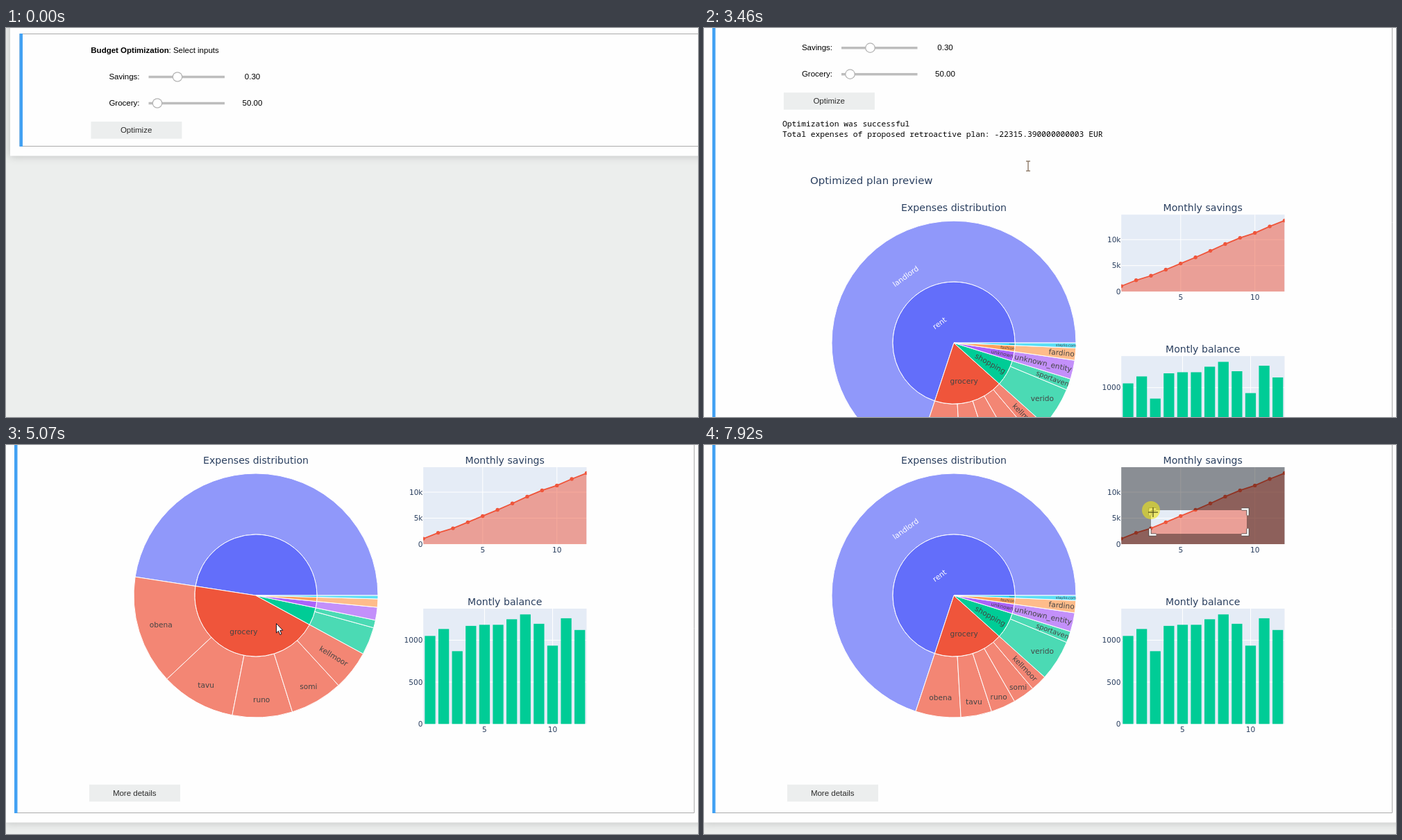
An HTML page with a canvas for the animation above (8000 ms loop, 997 by 561 pixels).

```html
<!DOCTYPE html>
<html lang="en">
<head>
<meta charset="utf-8">
<title>Budget optimization</title>
<style>
  html, body { margin: 0; width: 100%; height: 100%; overflow: hidden; background: #eceeed; }
  canvas { display: block; width: 997px; height: 561px; }
</style>
</head>
<body>
<canvas id="stage" width="997" height="561"></canvas>
<script>
const ctx = document.getElementById('stage').getContext('2d');
const LOOP = 8000;
const SCROLL_END = 279;
const UI = '11.5px "Liberation Sans", Arial, sans-serif';
const MONO = '11.32px "Noto Sans Mono", "DejaVu Sans Mono", monospace';
const plot = size => `${size}px "DejaVu Sans", Verdana, sans-serif`;
const INK = '#2a3f5f';
const TAU = 2 * Math.PI;

const clamp = v => Math.min(1, Math.max(0, v));
const progress = (t, from, to) => clamp((t - from) / (to - from));
const lerp = (a, b, k) => a + (b - a) * k;
const smooth = k => k * k * (3 - 2 * k);
const during = (t, from, to) => t >= from && t < to;
const sum = list => list.reduce((a, b) => a + b, 0);
const rad = degrees => degrees * Math.PI / 180;

function text(str, x, y, font, color = '#000', align = 'center') {
  ctx.font = font;
  ctx.fillStyle = color;
  ctx.textAlign = align;
  ctx.fillText(str, x, y);
}

function box(x, y, w, h, color) {
  ctx.fillStyle = color;
  ctx.fillRect(x, y, w, h);
}

function disc(x, y, r, color) {
  ctx.beginPath();
  ctx.arc(x, y, r, 0, TAU);
  ctx.fillStyle = color;
  ctx.fill();
}

function trace(points) {
  ctx.beginPath();
  points.forEach(([x, y]) => ctx.lineTo(x, y));
}

function stroke(color, width) {
  ctx.strokeStyle = color;
  ctx.lineWidth = width;
  ctx.stroke();
}

function placed(x, y, paint) {
  ctx.save();
  ctx.translate(x, y);
  paint();
  ctx.restore();
}

// ---- notebook page ----

function button(label, x, y, state = 'idle') {
  ctx.save();
  if (state !== 'idle') {
    ctx.shadowColor = 'rgba(0,0,0,.4)';
    ctx.shadowBlur = state === 'pressed' ? 7 : 3;
    ctx.shadowOffsetY = state === 'pressed' ? 3 : 1.5;
  }
  box(x, y, 131, 24.6, state === 'pressed' ? '#bdbdbd' : '#eceeee');
  ctx.restore();
  text(label, x + 65.2, y + 16, UI, state === 'idle' ? '#2b2b2b' : '#505050');
}

function slider(label, value, y, handleX) {
  text(label, 192.5, y + 3.7, UI, '#000', 'right');
  box(205.5, y - 1.7, 109.5, 3.5, '#bdbdbd');
  disc(handleX, y, 7.3, '#b3b3b3');
  disc(handleX, y, 6.1, '#fff');
  text(value, 355, y + 3.7, UI);
}

function drawPage(t) {
  const bottom = t < 2220 ? 170.5 : t < 2680 ? 207.5 : 530.5 + SCROLL_END;
  ctx.save();
  ctx.shadowColor = 'rgba(87,87,87,.3)';
  ctx.shadowBlur = 11;
  box(6, -30, 1100, bottom + 44, '#fefefe');
  ctx.restore();
  ctx.beginPath();
  ctx.rect(20, 8.5, 979, bottom - 8.5);
  stroke('#ababab', 1);
  box(19.5, 8, 4.5, bottom - 7.5, '#42a1f3');

  text('Budget Optimization', 122.3, 36, 'bold ' + UI, '#000', 'left');
  text(': Select inputs', 234.5, 36, UI, '#000', 'left');
  slider('Savings:', '0.30', 70.5, 247);
  slider('Grocery:', '50.00', 108.5, 218);
  const state = during(t, 1380, 1530) ? 'pressed' : during(t, 1300, 2680) ? 'hover' : 'idle';
  button('Optimize', 122.4, 135, state);
  if (t >= 2220) {
    text('Optimization was successful', 120.5, 184, MONO, '#000', 'left');
    text('Total expenses of proposed retroactive plan: -22315.390000000003 EUR',
      120.5, 199, MONO, '#000', 'left');
  }
}

// ---- sunburst ----

const RING = 88, LABEL = 10.6, LABEL_HEIGHT = 12.8;
const RED = '#ef553b', GREEN = '#00cc96';

// Spending per shop, as degrees of the full circle.
const plan = {
  rent: { color: '#636efa', shops: { landlord: 251.8 } },
  grocery: { color: RED, shops: { obena: 21.5, tavu: 14.7, runo: 11.8, somi: 10.4, kellmoor: 7.8 } },
  shopping: { color: GREEN, shops: { verido: 19.4, sportaven: 5.4 } },
  unknown: { color: '#ab63fa', shops: { unknown_entity: 9 } },
  fashion: { color: '#ffa15a', shops: { fardino: 5.8 } },
  travel: { color: '#19d3f3', shops: { 'staylio.com': 2.4 } }
};

const sectors = [];
let angle = 0;
for (const [group, { color, shops }] of Object.entries(plan)) {
  const start = angle, focused = group === 'grocery';
  for (const [name, span] of Object.entries(shops)) {
    sectors.push({ name, color, focused, ring: 1, from: angle, to: angle += span });
  }
  sectors.push({ name: group, color, focused, ring: 0, from: start, to: angle });
}
const focus = sectors.find(s => s.name === 'grocery');

const zoomAt = t => t < 6017 ? progress(t, 4831, 5581) : 1 - progress(t, 6017, 6767);

function zoomAngle(a, zoom) {
  if (a <= focus.from) return a * (1 - zoom);
  if (a >= focus.to) return 360 - (360 - a) * (1 - zoom);
  return lerp(a, (a - focus.from) / (focus.to - focus.from) * 360, zoom);
}

// Label pose that fits its sector: flat if there is room, else along the radius.
function fitLabel({ name, ring, from, to }) {
  ctx.font = plot(LABEL);
  const width = ctx.measureText(name).width;
  const span = to - from, middle = (from + to) / 2;
  const outer = RING * (ring + 1), depth = 1 / (ring + 1);
  const half = rad(Math.min(span / 2, 90));

  const along = (ratio, thickness, tilt) => {
    const q = ratio + 1 / (2 * Math.tan(half));
    const size = Math.min(1 / (Math.sqrt(q * q + 0.5) + q),
      depth / (Math.sqrt(ratio * ratio + depth / 2) + ratio));
    return { r: outer * (Math.cos(size) - ratio * size), tilt,
      scale: Math.min(1, 2 * size * outer / thickness) };
  };
  if (span > 180 && span < 359.9) return along(LABEL_HEIGHT / width, width, 90 - middle);
  const inscribed = span > 359.9 && !ring ? 1 : Math.min(1 / (1 + 1 / Math.sin(half)), depth / 2);
  if (2 * inscribed * outer >= Math.hypot(width, LABEL_HEIGHT)) {
    return { r: outer * (1 - inscribed), tilt: 0, scale: 1 };
  }
  return along(width / LABEL_HEIGHT, LABEL_HEIGHT, 360 - middle);
}

for (const s of sectors) {
  s.home = fitLabel(s);
  s.zoomed = s.focused
    ? fitLabel({ ...s, from: zoomAngle(s.from, 1), to: zoomAngle(s.to, 1) })
    : { r: 0, tilt: 0, scale: 0 };
}

function drawSector({ color, ring, from, to }, zoom) {
  const a = -rad(zoomAngle(from, zoom)), b = -rad(zoomAngle(to, zoom));
  if (a - b < 1e-4) return;
  ctx.beginPath();
  if (a - b > 6.283) ctx.arc(0, 0, RING, 0, TAU);
  else {
    ctx.arc(0, 0, RING * (ring + 1), a, b, true);
    if (ring) ctx.arc(0, 0, RING, b, a);
    else ctx.lineTo(0, 0);
    ctx.closePath();
  }
  ctx.globalAlpha = ring ? 0.7 : 1;
  ctx.fillStyle = color;
  ctx.fill();
  ctx.globalAlpha = 1;
  stroke('#fff', 1);
}

function drawLabel(s, t, zoom) {
  if (!s.focused && during(t, 4780, 6017)) return;
  const { home, zoomed } = s;
  const middle = rad((zoomAngle(s.from, zoom) + zoomAngle(s.to, zoom)) / 2);
  const centring = s === focus ? (t < 6017 ? zoom ** 3 : 1 - Math.cbrt(1 - zoom)) : zoom;
  const r = lerp(home.r, zoomed.r, centring);
  const scale = lerp(home.scale, zoomed.scale, zoom);
  placed(r * Math.cos(middle), -r * Math.sin(middle), () => {
    ctx.rotate(rad(lerp(home.tilt, zoomed.tilt, zoom)));
    ctx.scale(scale, scale);
    text(s.name, 0, LABEL * 0.34, plot(LABEL), s.color === plan.rent.color ? '#fff' : '#444');
  });
}

function drawSunburst(t) {
  const zoom = zoomAt(t);
  sectors.forEach(s => drawSector(s, zoom));
  sectors.forEach(s => drawLabel(s, t, zoom));
}

// ---- charts ----

const LEFT = 601.2, WIDE = 235.3;
const balance = [1051, 1134, 869, 1171, 1184, 1184, 1250, 1308, 1196, 935, 1262, 1122];
const savings = balance.map((_, i) => sum(balance.slice(0, i + 1)));

const savingsChart = {
  top: 32, base: 143, max: Math.max(...savings) / 0.923, step: 5000,
  format: v => v ? v / 1000 + 'k' : '0',
  x: month => LEFT + (month - 1) * WIDE / 11
};
const balanceChart = {
  top: 236, base: 402.3, max: Math.max(...balance) / 0.95, step: 500,
  format: String,
  x: month => LEFT + (month - 0.5) * WIDE / 12
};
const yOf = ({ top, base, max }, value) => lerp(base, top, value / max);

function drawAxes(chart) {
  const { top, base, max, step, format, x } = chart;
  box(LEFT, top, WIDE, base - top, '#e5ecf6');
  for (const month of [5, 10]) {
    box(x(month) - 0.5, top, 1, base - top, '#fff');
    text(month, x(month), base + 12, plot(LABEL), INK);
  }
  for (let v = 0; v < max; v += step) {
    box(LEFT, yOf(chart, v) - 0.5, WIDE, 1, '#fff');
    text(format(v), LEFT - 0.7, yOf(chart, v) + 3.8, plot(LABEL), INK, 'right');
  }
}

function drawSavings() {
  const { top, base, x } = savingsChart;
  drawAxes(savingsChart);
  const points = savings.map((v, i) => [x(i + 1), yOf(savingsChart, v)]);
  ctx.save();
  ctx.beginPath();
  ctx.rect(LEFT, top, WIDE, base - top);
  ctx.clip();
  trace([[LEFT, base], ...points, [LEFT + WIDE, base]]);
  ctx.fillStyle = 'rgba(239,85,59,.5)';
  ctx.fill();
  trace(points);
  stroke(RED, 1.8);
  points.forEach(([px, py]) => disc(px, py, 2.7, RED));
  ctx.restore();
}

function drawBalance() {
  const { base, x } = balanceChart;
  const width = WIDE / 12 * 0.8 - 0.4;
  drawAxes(balanceChart);
  balance.forEach((v, i) => {
    const y = yOf(balanceChart, v);
    box(x(i + 1) - width / 2, y, width, base - y, GREEN);
  });
}

function drawZoomBox(t, { x, y }) {
  const right = 782, bottom = 128;
  const { top, base } = savingsChart;
  const dim = 0.4 * progress(t, 7100, 7300);
  if (!dim) return;
  ctx.beginPath();
  ctx.rect(LEFT, top, WIDE, base - top);
  ctx.rect(x, y, right - x, bottom - y);
  ctx.fillStyle = `rgba(0,0,0,${dim})`;
  ctx.fill('evenodd');
  const arm = Math.min(9, (bottom - y) / 2, (right - x) / 2);
  for (const [px, sx] of [[x, 1], [right, -1]]) {
    for (const [py, sy] of [[y, 1], [bottom, -1]]) {
      const ox = px - sx * 1.5, oy = py - sy * 1.5;
      trace([[ox + sx * arm, oy], [ox, oy], [ox, oy + sy * arm]]);
      stroke('#444', 4);
      stroke('#fff', 2.4);
    }
  }
}

function drawCharts(t, pointer) {
  text('Optimized plan preview', 153, -12.5, plot(14.9), INK, 'left');
  text('Expenses distribution', 360, 27, plot(14.1), INK);
  text('Monthly savings', 718.7, 27, plot(14.1), INK);
  text('Montly balance', 718.7, 231, plot(14.1), INK);
  placed(360, 217, () => drawSunburst(t));
  drawSavings();
  drawBalance();
  button('More details', 120, 489.7);
  drawZoomBox(t, pointer);
}

// ---- pointer ----

// Each hop eases to a point between two times.
const hops = [
  { from: 130, to: 440, x: 505, y: 93 },
  { from: 610, to: 1380, x: 192, y: 154 },
  { from: 2679, to: 2680, x: 430, y: 205 },
  { from: 2680, to: 2920, x: 467, y: 199 },
  { from: 3850, to: 4150, x: 405, y: 190 },
  { from: 4230, to: 4610, x: 389, y: 257 },
  { from: 5920, to: 6760, x: 710, y: 128 },
  { from: 6770, to: 7000, x: 782, y: 128 },
  { from: 7100, to: 7520, x: 644, y: 108 },
  { from: 7919, to: 7920, x: 644, y: 94 }
];
const presses = [[1380, 1530], [4610, 4780], [5770, 5920], [7040, LOOP]];

function pointerAt(t) {
  return hops.reduce((at, hop) => {
    const k = smooth(progress(t, hop.from, hop.to));
    return { x: lerp(at.x, hop.x, k), y: lerp(at.y, hop.y, k) };
  }, { x: 920, y: 548 });
}

function plus(color, width, arm) {
  box(-arm, -width / 2, 2 * arm, width, color);
  box(-width / 2, -arm, width, 2 * arm, color);
}

const DARK = '#1a1420';
const shapes = {
  arrow() {
    trace([[0.5, 0.5], [0.5, 14], [3.5, 11.2], [5.8, 16.6], [8, 15.6], [5.8, 10.4], [9.8, 10.2]]);
    ctx.closePath();
    ctx.fillStyle = '#fff';
    ctx.fill();
    stroke(DARK, 1);
  },
  hand() {
    const finger = i => -1 + 2.7 * i;
    ctx.beginPath();
    for (let i = 0; i < 4; i++) ctx.roundRect(finger(i), i ? 5.5 + i * 0.5 : 0, 2.7, 12, 1.3);
    ctx.roundRect(-0.5, 9, 9.8, 10, 3);
    ctx.ellipse(-1.6, 12.5, 4, 1.7, 0.8, 0, TAU);
    stroke(DARK, 2);
    ctx.fillStyle = '#fff';
    ctx.fill();
    for (let i = 1; i < 4; i++) box(finger(i) - 0.4, 6.5, 0.8, 3.5, DARK);
  },
  beam() {
    for (const y of [-7.5, 6.5]) box(-3, y, 6, 1.2, '#7c6650');
    box(-0.6, -7, 1.2, 14, '#7c6650');
  },
  cross() {
    plus('#1c5560', 1.8, 10.5);
  },
  drag() {
    placed(3, 3, () => plus('#4f4c18', 1.2, 7));
  }
};

function shapeAt(t) {
  if (during(t, 1300, 2680)) return 'hand';
  if (during(t, 2920, 4000)) return 'beam';
  if (during(t, 4100, 4780) || during(t, 5581, 5920)) return 'hand';
  if (t >= 7100) return 'drag';
  return t >= 6640 ? 'cross' : 'arrow';
}

function drawPointer(t, { x, y }) {
  if (t < 130) return;
  if (presses.some(([from, to]) => during(t, from, to))) disc(x, y, 13, 'rgba(240,230,20,.6)');
  placed(x, y, shapes[shapeAt(t)]);
}

function draw(t) {
  const pointer = pointerAt(t);
  const scroll = SCROLL_END * (1 - (1 - progress(t, 3390, 4150)) ** 1.657);
  box(0, 0, 997, 561, '#eceeed');
  placed(t < 2680 ? 0 : -7.5, -scroll, () => drawPage(t));
  if (t >= 2840) placed(0, SCROLL_END - scroll, () => drawCharts(t, pointer));
  drawPointer(t, pointer);
}

const start = performance.now();
function tick() {
  draw((performance.now() - start) % LOOP);
  requestAnimationFrame(tick);
}
tick();
</script>
</body>
</html>
```
